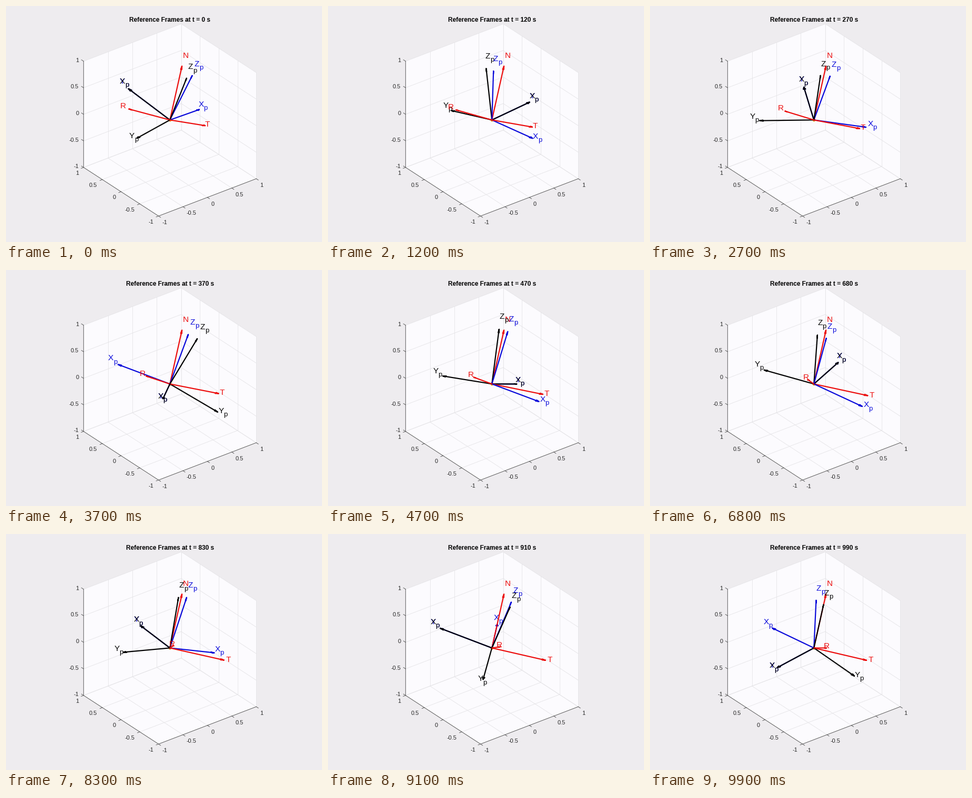
A matplotlib script that plays this animation: 600x450 px, repeating every 10 s.

```python
import numpy as np
import matplotlib.pyplot as plt
from matplotlib.animation import FuncAnimation

plt.rcParams["font.family"] = "Liberation Sans"
PX = 0.72                          # points per pixel at 100 dpi
FRAMES = 100
ORIGIN = np.array([311.2, 217.3])  # axes origin on the stage
SCALE = 116.9                      # pixels per axis unit
ARROW = 0.9                        # arrow length in axis units
RED, BLUE, BLACK = "#ec0d0d", "#0808da", "#000000"
INK, EDGE, GRID = "#262626", "#505050", "#e6e5e8"
WALL, BACK = "#fcfbfe", "#eeecef"


def wave(deg):
    return np.cos(np.radians(deg)), np.sin(np.radians(deg))


# ---- camera: rows are right, up and toward the viewer ----
ca, sa = wave(37.5)
ce, se = wave(30)
VIEW = np.array([[ca, -sa, 0],
                 [sa * se, ca * se, ce],
                 [-sa * ce, -ca * ce, se]])


def project(p):
    right, up, _ = VIEW @ p
    return ORIGIN + SCALE * np.array([right, -up])


# ---- orbit frame: radial, transverse, normal ----
ci, si = wave(35)                  # inclination
cn, sn = wave(120.2)               # ascending node
NODE = np.array([cn, sn, 0])
NORMAL = np.array([si * sn, -si * cn, ci])
AHEAD = np.cross(NORMAL, NODE)


def orbit_axes(i):
    c, s = wave(59.3 + 0.633 * i)
    return c * NODE + s * AHEAD, c * AHEAD - s * NODE, NORMAL


# ---- torque-free spin about a fixed angular momentum ----
MOMENTUM = np.array([0.258, -0.010, 0.966])
MOMENTUM /= np.linalg.norm(MOMENTUM)
SIDE = np.cross(MOMENTUM, [1, 0, 0])
SIDE /= np.linalg.norm(SIDE)
FRONT = np.cross(SIDE, MOMENTUM)


def principal_axes(i):
    # the momentum runs along an ellipse as seen from the body
    c, s = wave(94.5 + 27.1 * i)
    a, b = 0.122 * c, 0.235 * s
    h = np.sqrt(1 - a * a - b * b)
    k = 1 / (1 + h)
    wobble = np.array([[1 - k * a * a, -k * a * b, a],
                       [-k * a * b, 1 - k * b * b, b],
                       [-a, -b, h]])
    c, s = wave(18.5 + 51.745 * i)
    return wobble @ np.array([c * FRONT + s * SIDE,
                              c * SIDE - s * FRONT, MOMENTUM])


def body_axes(axes):
    """Body frame, tilted from the principal frame about a shared axis."""
    c, s = wave(10.3)
    x, y, z = axes
    return y, -s * z - c * x, c * z - s * x


# ---- static stage ----
fig = plt.figure(figsize=(6, 4.5), dpi=100, facecolor=BACK)
ax = fig.add_axes([0, 0, 1, 1])
ax.set_xlim(0, 600)
ax.set_ylim(450, 0)
ax.axis("off")


def polyline(points, color, zorder):
    ax.plot(*zip(*map(project, points)), color=color, lw=0.9 * PX,
            zorder=zorder)


def tick(point, mark, offset, name, ha):
    x, y = project(point)
    ax.plot([x, x + mark[0]], [y, y + mark[1]], color=EDGE, lw=0.9 * PX,
            zorder=3)
    ax.text(x + offset[0], y + offset[1], name, ha=ha, color=INK,
            va="center_baseline", fontsize=11 * PX, zorder=3)


# each plane of the box is one fixed coordinate
for axis, level in ((0, 1), (1, 1), (2, -1)):
    def on_plane(p, q):
        return np.insert(np.array([p, q], float), axis, level)

    corners = [on_plane(*c) for c in ((-1, -1), (-1, 1), (1, 1), (1, -1))]
    ax.fill(*zip(*map(project, corners)), color=WALL, lw=0, zorder=1)
    for v in np.linspace(-1, 1, 5):
        polyline([on_plane(v, -1), on_plane(v, 1)], GRID, 2)
        polyline([on_plane(-1, v), on_plane(1, v)], GRID, 2)

polyline([(-1, 1, 1), (-1, 1, -1), (-1, -1, -1), (1, -1, -1)], EDGE, 3)
for v in np.linspace(-1, 1, 5):
    name = f"{v:g}"
    tick((-1, 1, v), (-4, -2.6), (-9, -2.4), name, "right")
    tick((-1, v, -1), (-4.5, 1.7), (-9.5, 10.2), name, "right")
    tick((v, -1, -1), (4, 2.6), (6.8, 11.6), name, "left")

ax.plot(*ORIGIN, "o", ms=6 * PX, color="#eda52a", mew=0, zorder=9)
title = ax.text(ORIGIN[0], 29.5, "", ha="center", weight="bold",
                fontsize=11.9 * PX)


class Arrow:
    def __init__(self, name, color, lift):
        self.lift = lift
        self.line, = ax.plot([], [], color=color, lw=2.2 * PX,
                             solid_capstyle="round", solid_joinstyle="round")
        self.label = ax.text(0, 0, name[0], fontsize=15.3 * PX, color=color)
        self.sub = ax.text(0, 0, name[1:], fontsize=13 * PX, color=color)
        shift = (-0.6, -5) if name[0] in "ZN" else (-7.8, 0)
        self.shift = np.array(shift) + (0, -3.6 if name[1:] else 0.8)

    def place(self, vec):
        tip = project(ARROW * vec)
        base = project(0.94 * ARROW * vec)
        # the barbs lie in the horizontal plane
        barb = project(0.018 * np.cross(vec, [0, 0, 1])) - ORIGIN
        gap = (np.nan, np.nan)
        self.line.set_data(*zip(ORIGIN, tip, gap,
                                base + barb, tip, base - barb))
        depth = VIEW[2] @ vec
        self.line.set_zorder(10 + depth / 2 + self.lift)
        spot = project(vec) + self.shift
        self.label.set_position(spot)
        self.sub.set_position(spot + (9.6, 6.3))
        for text in (self.label, self.sub):
            text.set_zorder(10 + depth + self.lift)


def triad(names, color, lift=0):
    return [Arrow(n, color, lift) for n in names]


orbit = triad(("R", "T", "N"), RED)
principal = triad(("Xp", "Yp", "Zp"), BLUE)
body = triad(("Xp", "Yp", "Zp"), BLACK, 0.01)


def draw(i):
    title.set_text(f"Reference Frames at t = {10 * i} s")
    axes = principal_axes(i)
    for arrows, vectors in ((orbit, orbit_axes(i)), (principal, axes),
                            (body, body_axes(axes))):
        for arrow, vec in zip(arrows, vectors):
            arrow.place(vec)
    return []


anim = FuncAnimation(fig, draw, frames=FRAMES, interval=100,
                     repeat=True, repeat_delay=0, blit=False)
plt.show()
```
